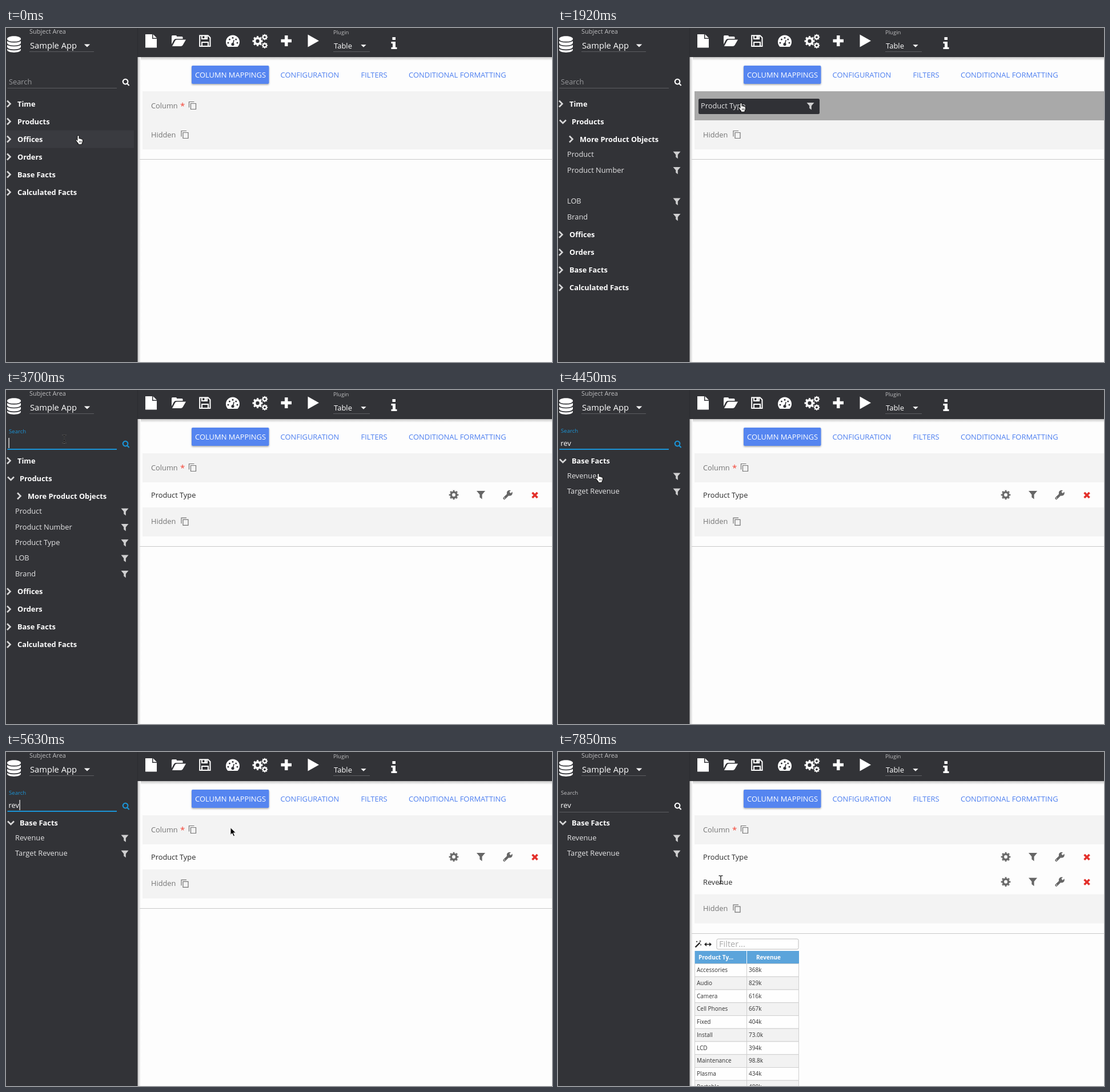
An HTML page for the animation above (7990 ms loop, 956 by 586 pixels).

```html
<!DOCTYPE html>
<html lang="en">
<head>
<meta charset="utf-8">
<title>Report builder</title>
<style>
  html, body { margin: 0; height: 100%; overflow: hidden; background: #fdfdfd; }
  svg { display: block; font-family: "Open Sans", sans-serif; }
  text { white-space: pre; }
</style>
</head>
<body>
<svg width="956" height="586" viewBox="0 0 956 586">
  <defs>
    <linearGradient id="right"><stop stop-color="#c4c4c4"/><stop offset="1" stop-color="#fdfdfd"/></linearGradient>
    <linearGradient id="down" x2="0" y2="1"><stop stop-color="#c4c4c4"/><stop offset="1" stop-color="#fdfdfd"/></linearGradient>
    <filter id="shadow" x="-10%" y="-20%" width="120%" height="150%">
      <feDropShadow dx="0" dy="1.5" stdDeviation="1.5" flood-opacity=".35"/>
    </filter>
  </defs>
  <g id="base"></g>
  <g id="live"></g>
</svg>
<script>
const LOOP = 7990, STEP = 148, LAST_STEP = 53;
const DARK = '#323337', BLUE = '#1b94d6', LIGHT = '#d8d8d9', LINE = '#5c5d61', GREY = '#757575';

// Drawing helpers; text is placed by the middle of its capitals
const text = (x, y, str, fill = '#fff', size = 12.8, weight = 400) =>
  `<text x="${x}" y="${y + size * .36}" fill="${fill}" font-size="${size}" font-weight="${weight}">${str}</text>`;
const rect = (x, y, w, h, fill, extra = '') =>
  `<rect x="${x}" y="${y}" width="${w}" height="${h}" fill="${fill}" ${extra}/>`;
const path = (d, fill = '#fff', extra = '') => `<path d="${d}" fill="${fill}" ${extra}/>`;
const stroke = (d, color, width = 1, extra = '') =>
  `<path d="${d}" fill="none" stroke="${color}" stroke-width="${width}" ${extra}/>`;
const disc = (x, y, r, fill) => `<circle cx="${x}" cy="${y}" r="${r}" fill="${fill}"/>`;
const at = (x, y, body, scale = 1) => `<g transform="translate(${x} ${y}) scale(${scale})">${body}</g>`;

const gear = (x, y, r, color) => at(x, y,
  `<g fill="none" stroke="${color}"><circle r="${r * .58}" stroke-width="${r * .44}"/>
   <circle r="${r * .85}" stroke-width="${r * .34}" pathLength="16" stroke-dasharray="1" stroke-dashoffset=".5"/></g>`);
const funnel = (x, y, color = '#cfcfd0', scale = 1) =>
  at(x, y, path('M-6.5-6h13l-4.7 5.6v6.9l-3.6-2.8v-4.1z', color), scale);
const copyIcon = (x, y) =>
  stroke(`M${x - 2.5} ${y - 3.5}h9v10h-9zM${x - 5.5} ${y + 3.5}v-10h9`, GREY, 1.2);
const triangle = (x, y, half) => path(`M${x - half} ${y - half / 2}h${2 * half}l${-half} ${half}z`);
const chevron = (x, y, open) => open
  ? stroke(`M${x + 1} ${y - 2.5}l5.5 5.5l5.5-5.5`, LIGHT, 2.6)
  : stroke(`M${x} ${y - 5.5}l5.5 5.5l-5.5 5.5`, LIGHT, 2.6);
const wrench = (x, y) => at(x, y,
  stroke('M-6 6L2-2', '#666', 4.2, 'stroke-linecap="round"') + disc(3.3, -3.3, 5, '#666') +
  stroke('M4-4L10-10', '#fdfdfd', 3.6) + disc(-5.6, 5.6, .9, '#fdfdfd'));

const cursors = {
  hand: path('M-1.6-7.5c1.3 0 1.7.8 1.7 1.8v3.4c1-.6 2-.3 2.3.5c1-.4 2 0 2.2.8c1.2-.2 1.9.5 1.9 1.6v3.2l-1.5 3v1.4h-6.6v-1.5l-2.8-3.4l-1.5-2.3c-.5-1.4 1-2 2-1l.8.8v-6.5c0-1 .4-1.8 1.5-1.8z',
    '#fff', 'stroke="#111" stroke-width="1.1"') + stroke('M.5 2v3M2.4 2v3M4.2 2v3', '#111', .7),
  arrow: path('M-5-7.5v13l3-2.8l2.3 5.2l2.3-1l-2.3-5h4.2z', '#000', 'stroke="#fff" stroke-width="1"'),
  beam: ['#bbb', '#111'].map((c, i) =>
    stroke('M-3.5-7h2L0-6L1.5-7h2M0-6V6M-3.5 7h2L0 6L1.5 7h2M-1.5 2.5h3', c, 2 - i * .8, i ? '' : 'opacity=".5"')).join('')
};

function toolbar() {
  const database = path('M2 19c0-6.5 24-6.5 24 0v19c0 6.5-24 6.5-24 0z') +
    [20.5, 27.3, 34.1].map(y => stroke(`M1.5 ${y}c2 5.6 23 5.6 25 0`, DARK, 1.7)).join('');
  const file = path('M244 11h12v8h8v15.5h-20zM257.5 11l6.5 6.5h-6.5z');
  const folder = path('M290 28.5v-14q0-1.5 1.5-1.5h6q1.5 0 1.5 2h9q1.5 0 1.5 1.5v2.5h-12q-2 0-3.5 2zM291 32l5-9.5q1-2 3-2h16l-5.5 9.5q-1.2 2-3.5 2z');
  const floppy = stroke('M339.2 13.2h14.5l3.8 3.8v15h-18.3zM343 32v-7h11v7M343 13v6h9v-6', '#fff', 2) + rect(347.5, 14, 3, 4, '#fff');
  const gauge = path('M388.5 33a12 12 0 1 1 17 0z') + stroke('M397 29l2.2-8', DARK, 1.6) + disc(397, 28.5, 2.6, DARK) +
    [[389, 26], [391.5, 20], [397, 17.2], [402.7, 20], [405, 26]].map(([x, y]) => disc(x, y, 1.5, DARK)).join('');
  const cogs = gear(440.5, 23, 8.8, '#fff') + gear(453, 16, 5.2, '#fff') + gear(453, 30.5, 5.2, '#fff');
  const plus = path('M488 13h5.5v6.7h6.5v5.5h-6.5v6.8h-5.5v-6.8h-6.5v-5.5h6.5z');
  const play = path('M528.5 11.5l19.5 11l-19.5 11z');
  const info = path('M676.5 16h5.5v5h-5.5zM674.5 24h7.5v9.7h2.5v3.3h-10v-3.3h2.5v-6.4h-2.5z');
  return database + file + folder + floppy + gauge + cogs + plus + play + info;
}

document.getElementById('base').innerHTML =
  rect(230, 51, 726, 6, 'url(#down)') + rect(230, 51, 6, 535, 'url(#right)') +
  rect(0, 0, 956, 51, DARK) + rect(0, 51, 230.5, 535, DARK) + rect(230, 0, 1, 51, '#2b2c30') + toolbar() +
  text(41, 6, 'Subject Area', '#bdbdbf', 11) + text(42, 30.5, 'Sample App', '#fff', 14.7) + triangle(142, 31, 5.2) +
  text(573, 8, 'Plugin', '#bdbdbf', 9.5) + text(574, 31, 'Table', '#fff', 13) + triangle(626, 31.5, 4.7) +
  stroke('M41 41.5h113M573 41.5h64', LINE) +
  rect(325, 66, 135.5, 32, '#5585f0', 'rx="2" filter="url(#shadow)"') +
  [[331, 'COLUMN MAPPINGS', '#fff'], [480.5, 'CONFIGURATION'], [621.5, 'FILTERS'], [705, 'CONDITIONAL FORMATTING']]
    .map(([x, label, color = '#4d7ff0']) => text(x, 82, label, color, 12.95)).join('');

// Timelines, counted in steps
const cursorPath = [[0, 128, 196], [2, 112, 170], [5, 112, 170], [9, 88, 280], [10, 88, 280], [13, 322, 139],
  [14, 330, 138], [15, 330, 138], [20, 102, 86], [28, 102, 86], [30, 72, 154], [31, 72, 154], [33, 300, 180],
  [34, 405, 163], [36, 400, 142], [37, 398, 140], [39, 398, 140], [43, 547, 26], [48, 547, 26], [53, 285, 224]];
const revenuePath = [[31, 16, 150], [34, 349, 141], [36, 344, 133]];
const cursorKinds = [[0, 'hand'], [15, 'arrow'], [20, 'beam'], [29, 'hand'], [37, 'arrow'], [43, 'hand'], [50, 'arrow'], [53, 'beam']];

function along(keys, s) {
  const i = keys.findIndex(k => k[0] > s);
  if (i < 0) return keys.at(-1).slice(1);
  const [t0, x0, y0] = keys[i - 1], [t1, x1, y1] = keys[i], p = (s - t0) / (t1 - t0);
  return [x0 + (x1 - x0) * p, y0 + (y1 - y0) * p];
}

const group = (y, label, open = false, x = 2) =>
  chevron(x, y, open) + text(open ? 24 : x + 18, y, label, '#fff', 12.8, 700);
const field = (x, y, label) => text(x, y, label, '#e4e4e5') + funnel(x + 192, y + 1);

function searchBox(s) {
  const focused = s >= 21 && s < 43, lift = Math.min(1, Math.max(0, (s - 20) / 2));
  const typed = 'rev'.slice(0, Math.max(0, s - 25));
  const caretOn = ((s * STEP + 440) % 1000) < 500;
  const top = typed ? 72 : 73, color = focused ? BLUE : lift ? '#bdbdbf' : '#98999c';
  return text(5, 94 - (94 - top) * lift, 'Search', color, 12.8 - 3.2 * lift) + text(4.5, 93, typed) +
    (focused ? rect(2.5, 103, 191.5, 2, BLUE) : stroke('M2.5 105.5h191.5', LINE)) +
    (focused && caretOn ? rect([4.5, 10, 17, 23.5][typed.length], 84, 1.2, 18, '#fff') : '') +
    stroke('M212.3 97a4.3 4.3 0 1 0-.3.3l3.6 3.6', focused ? BLUE : '#fff', 2.1);
}

function sidebar(s, dragged, cursorY) {
  const fields = (names, y) => names.map((n, i) => n === dragged ? '' : field(16, y + 27.3 * i, n)).join('');
  const groups = (names, y) => names.map((n, i) => group(y + 31 * i, n)).join('');
  const rest = ['Offices', 'Orders', 'Base Facts', 'Calculated Facts'];
  if (s >= 29) return group(124, 'Base Facts', true) + fields(['Revenue', 'Target Revenue'], 150.5);
  if (s < 3) {
    const hovered = Math.round((cursorY - 139) / 31);
    return rect(0, 117.5 + 31 * hovered, 224, 31, '#3a3b40') + groups(['Time', 'Products', ...rest], 133);
  }
  return at(0, s >= 21 ? -9 : 0, group(133, 'Time') + group(164, 'Products', true) +
    group(195, 'More Product Objects', false, 20) +
    fields(['Product', 'Product Number', 'Product Type', 'LOB', 'Brand'], 221.7) + groups(rest, 362.5));
}

function mappings(rows, over) {
  const y = 162 + 43.8 * rows.length;
  return rect(239, 111, 717, 51, over || '#f3f3f3') + text(254, 136, 'Column', over ? '#efefef' : GREY) +
    text(305, 136.5, '*', '#f44336', 15) + copyIcon(326, 136) +
    rows.map((name, i) => {
      const mid = 184.5 + 43.8 * i;
      return text(254, mid, name, '#2b2b2b') + gear(784, mid - .5, 8.2, '#6b6b6b') +
        funnel(831.5, mid - .5, '#666', 1.16) + wrench(878.5, mid - .5) +
        stroke(`M921.5 ${mid - 4.5}l9 9m0-9l-9 9`, '#e3302b', 3.6);
    }).join('') +
    rect(239, y, 717, 51, '#f3f3f3') + text(254, y + 25, 'Hidden', GREY) + copyIcon(312.5, y + 25) +
    stroke(`M234 ${Math.round(y + 68) + .5}H956`, '#c9c9c9');
}

function resultTable() {
  const data = [['Accessories', '368k'], ['Audio', '829k'], ['Camera', '616k'], ['Cell Phones', '667k'], ['Fixed', '404k'],
    ['Install', '73.0k'], ['LCD', '394k'], ['Maintenance', '98.8k'], ['Plasma', '434k'], ['Portable', '480k']];
  const wand = stroke('M240.5 342.5l8-8', '#222', 2.4) +
    stroke('M249 330.5v3M247.5 332h3M243 331.5v2.4M241.8 332.7h2.4M250 337v2.4M248.8 338.2h2.4', '#222', .9);
  const arrows = stroke('M258 337.5h9', '#222', 1.6) + path('M256 337.5l4-3.5v7zM269 337.5l-4-3.5v7z', '#222');
  return wand + arrows + rect(278, 328, 143, 18, '#fff', 'rx="2.5" stroke="#bbb"') +
    text(282, 337, 'Filter...', '#aaa', 14.6) +
    rect(239.5, 349, 182.5, 22.5, '#5ba4db') + stroke('M330.5 349v22.5', '#fff') +
    text(246, 360, 'Product Ty...', '#fff', 10, 700) + text(347, 360, 'Revenue', '#fff', 10, 700) +
    data.map(([type, value], i) => {
      const y = 371.5 + 22.75 * i;
      return rect(239.5, y, 182, 22.75, i % 2 ? '#f2f2f2' : '#fefefe', 'stroke="#cfcfcf"') +
        text(243, y + 11, type, '#333', 10) + text(334, y + 11, value, '#333', 10);
    }).join('') + stroke('M330.5 371.5V586', '#cfcfcf');
}

function scene(s) {
  const [x, y] = along(cursorPath, s);
  const kind = cursorKinds.findLast(k => k[0] <= s)[1];
  const dragged = s >= 10 && s < 15 ? 'Product Type' : s >= 31 && s < 37 ? 'Revenue' : '';
  const rows = ['Product Type', 'Revenue'].slice(0, (s >= 16) + (s >= 39));
  const over = dragged && x > 239 && y < 169 && (rows.length ? '#bababa' : '#a9a9a9');
  let chip = '';
  if (dragged) {
    const [cx, cy] = dragged === 'Revenue' ? along(revenuePath, s) : [x - 72, y - 3];
    chip = rect(cx - 4, cy - 12, 212, 27, '#303136', 'rx="2.5"') + field(cx, cy, dragged);
  }
  return searchBox(s) + sidebar(s, dragged, y) + mappings(rows, over) +
    (s >= 45 ? resultTable() : '') + chip + at(x, y, cursors[kind]);
}

const live = document.getElementById('live');
let shown = -1;
function tick() {
  const step = Math.min(LAST_STEP, Math.floor((performance.now() % LOOP + 8) / STEP));
  if (step !== shown) live.innerHTML = scene(shown = step);
  requestAnimationFrame(tick);
}
tick();
</script>
</body>
</html>
```
